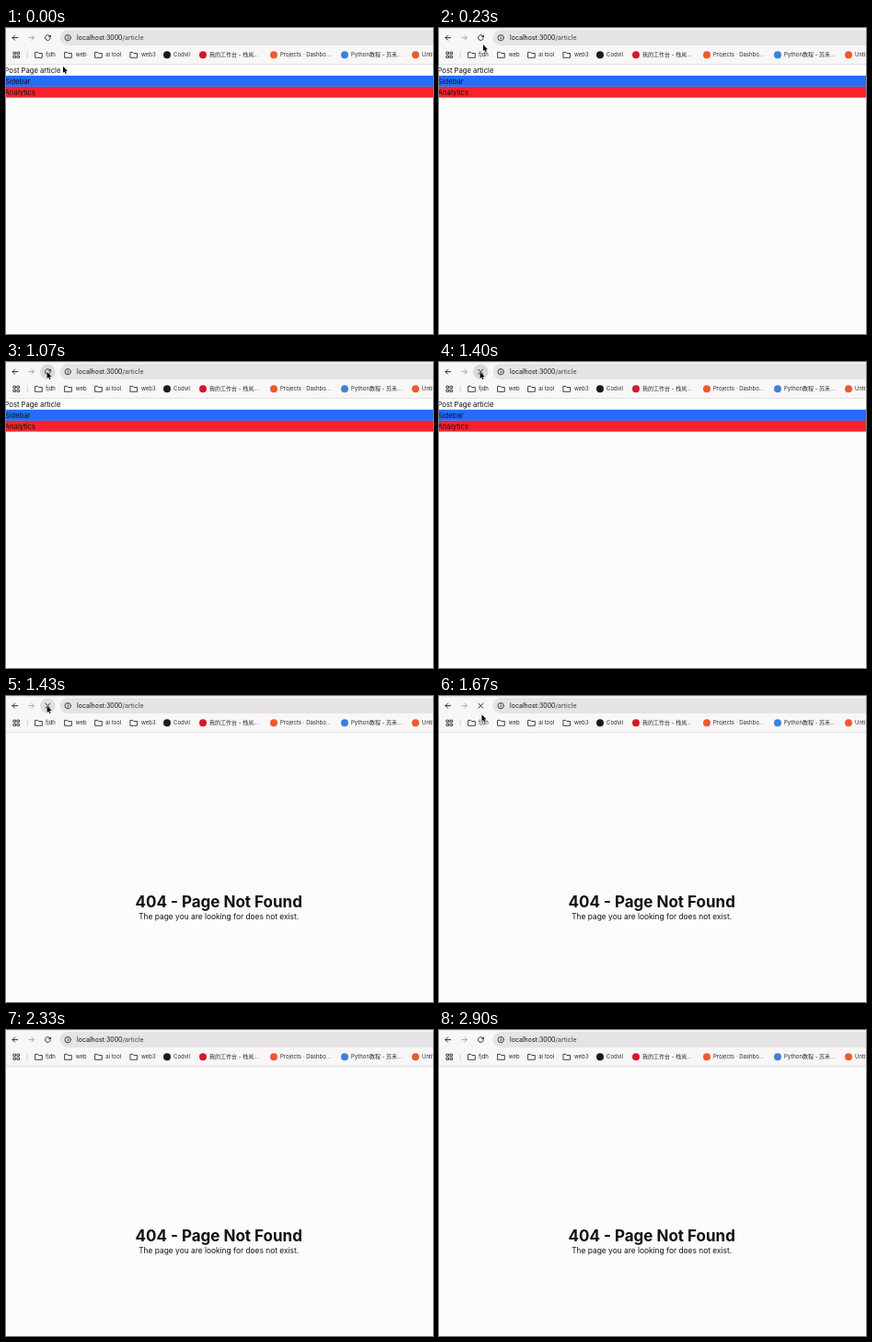
Write an HTML page that moves like this. It is 464 px wide and 333 px high and loops after 2.93 s.

```html
<!DOCTYPE html>
<html lang="en">
<head>
<meta charset="utf-8">
<title>Browser reload</title>
<style>
  html, body { margin: 0; width: 100%; height: 100%; overflow: hidden; background: #fcfcfc; }
  svg { display: block; width: 464px; height: 333px; }
  text { font-family: Inter, "Noto Sans CJK SC", "Noto Sans CJK", sans-serif; fill: #111; white-space: pre; }
  .line { fill: none; stroke: #303030; stroke-width: 1; stroke-linecap: round; stroke-linejoin: round; }
  .bookmark { font-size: 6px; fill: #2b2b2b; }
  .page { font-size: 7.65px; }
</style>
</head>
<body>
<svg viewBox="0 0 464 333">
  <rect width="464" height="333" fill="#fcfcfc"/>

  <g id="article">
    <rect y="40" width="464" height="12" fill="#fff"/>
    <rect y="51.8" width="464" height="12.1" fill="#236dfb"/>
    <rect y="63.9" width="464" height="11.8" fill="#f9222c"/>
    <g class="page">
      <text x="-1.5" y="48.6">Post Page article</text>
      <text x="-1.2" y="60.7">Sidebar</text>
      <text x="-1.2" y="72.7">Analytics</text>
    </g>
  </g>

  <g id="missing" text-anchor="middle">
    <text x="231.2" y="229.7" font-size="17" font-weight="700">404 - Page Not Found</text>
    <text x="231.2" y="243.2" font-size="8.4">The page you are looking for does not exist.</text>
  </g>

  <rect width="464" height="39.5" fill="#f9f6f7"/>
  <rect width="464" height="1" fill="#ebe8e9"/>
  <rect y="39" width="464" height="1" fill="#e3e0e1"/>
  <rect x="58.5" y="2" width="430" height="17" rx="8.5" fill="#e6e3e4"/>

  <path class="line" d="M12.6 10.6H7M9.6 8L7 10.6l2.6 2.6"/>
  <path class="line" style="stroke:#aaa8a8" d="M24.8 10.6h5.6M27.8 8l2.6 2.6-2.6 2.6"/>
  <circle id="hover" cx="45.3" cy="10.6" r="8.2" fill="#dcd9da"/>
  <g id="reload">
    <path class="line" d="M48 9.2A2.9 2.9 0 1 0 48.2 11.4"/>
    <path d="M48.9 7.2v3h-3z" fill="#303030"/>
  </g>
  <path id="stop" class="line" d="M42.8 8.1l5 5M47.8 8.1l-5 5"/>

  <circle cx="67.2" cy="10.6" r="3.2" class="line" style="stroke-width:.9"/>
  <path d="M67.2 10.3v1.8M67.2 8.8v.3" class="line" style="stroke-width:.9"/>
  <text x="77" y="13.2" font-size="7">localhost:3000<tspan fill="#444">/article</tspan></text>

  <g id="bookmarks"></g>
  <path d="M23.2 25.5v7.5" stroke="#d0cdce" stroke-width=".9"/>

  <path id="cursor" d="M0 0V7.1L1.6 5.7L2.7 8.2L3.9 7.7L2.8 5.3H5Z"
    fill="#000" stroke="#fff" stroke-width=".7" stroke-linejoin="round" paint-order="stroke"/>
</svg>

<script>
const LOOP = 2930;
const PAGE_SWAP = 1430;
const $ = id => document.getElementById(id);

const folder = x =>
  `<path class="line" style="stroke-width:.9" d="M${x} 26.4h2.6l1 1.1h3.7v4.8h-7.3z"/>`;
const dot = (x, color) => `<circle cx="${x}" cy="29.2" r="4" fill="${color}"/>`;
const label = (x, text) => `<text class="bookmark" x="${x}" y="31.2">${text}</text>`;
const tile = (x, y) =>
  `<rect class="line" style="stroke-width:.9" x="${x}" y="${y}" width="2.2" height="2.2"/>`;

const folders = [[32, 43, "fjdh"], [64, 75.8, "web"], [97, 108.2, "ai tool"], [135.3, 147, "web3"]];
const sites = [
  [175, "#1b1b1f", 182, "Codvil"],
  [214, "#d3182b", 221, "我的工作台 - 栈岚..."],
  [291, "#ee5a2a", 298, "Projects · Dashbo..."],
  [368, "#3b82d8", 375, "Python教程 - 苏禾..."],
  [445, "#f0592b", 452, "Untitled"]
];
$("bookmarks").innerHTML =
  [[8.3, 26.2], [12.3, 26.2], [8.3, 30.2], [12.3, 30.2]].map(p => tile(...p)).join("") +
  folders.map(([icon, x, text]) => folder(icon) + label(x, text)).join("") +
  sites.map(([icon, color, x, text]) => dot(icon, color) + label(x, text)).join("");

// Pointer keys: time, x, y
const path = [
  [0, 62, 41.8], [40, 61, 40], [230, 48, 18], [530, 45.8, 12.5],
  [600, 44.6, 10.8], [1640, 44.6, 10.8], [1800, 50, 38]
];

function pointerAt(t) {
  const i = path.findIndex(key => key[0] > t);
  if (i < 1) return path[path.length - 1].slice(1);
  const [t0, x0, y0] = path[i - 1], [t1, x1, y1] = path[i];
  const u = (t - t0) / (t1 - t0), k = u * (2 - u);
  return [x0 + (x1 - x0) * k, y0 + (y1 - y0) * k];
}

const show = (id, on) => $(id).setAttribute("visibility", on ? "visible" : "hidden");

function hoverAt(t) {
  if (t < 570) return 0;
  if (t < 1400) return 1;
  return Math.max(0, 1 - (t - 1400) / 180);
}

function render(t) {
  const loading = t >= 1340 && t < 1680;
  show("article", t < PAGE_SWAP);
  show("missing", t >= PAGE_SWAP);
  show("reload", !loading);
  show("stop", loading);
  show("cursor", t < 1800);
  $("hover").setAttribute("opacity", hoverAt(t));
  $("cursor").setAttribute("transform", `translate(${pointerAt(t)})`);
}

const start = performance.now();
function tick() {
  render((performance.now() - start) % LOOP);
  requestAnimationFrame(tick);
}
tick();
</script>
</body>
</html>
```
